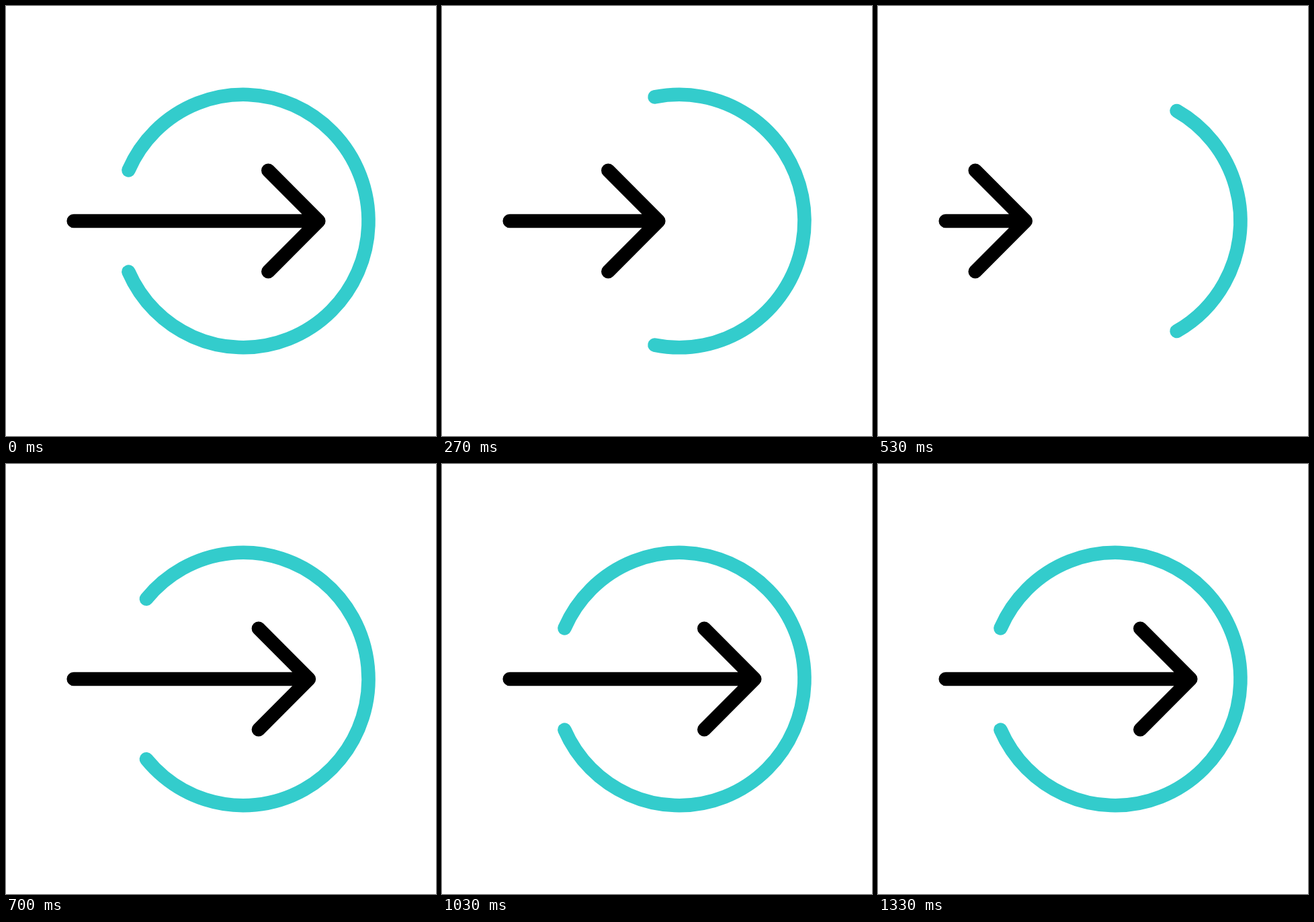
An HTML page with a canvas for the animation above (2 s loop, 640 px wide and 640 px high).

```html
<!DOCTYPE html>
<html lang="en">
<head>
<meta charset="utf-8">
<title>Arrow entering a ring</title>
<style>
  html, body { margin: 0; width: 100%; height: 100%; overflow: hidden; background: #fff; }
  canvas { display: block; }
</style>
</head>
<body>
<canvas id="stage" width="640" height="640"></canvas>
<script>
const ctx = document.getElementById('stage').getContext('2d');
ctx.lineWidth = 20.6;
ctx.lineCap = ctx.lineJoin = 'round';

const LOOP = 2000;
// [tick, value] at 30 ticks per second
const ARROW_SHIFT = [[0, 0], [15, 260], [22, 0], [27, 142], [31, 0], [36, 85], [40, 0]];
const RING_GAP = [[0, 23.7], [15, 123.7], [23, 23.7]];

function valueAt(keys, tick) {
  const next = keys.findIndex(([k]) => k > tick);
  if (next < 0) return keys[keys.length - 1][1];
  const [t0, v0] = keys[next - 1];
  const [t1, v1] = keys[next];
  const p = (tick - t0) / (t1 - t0);
  return v0 + (v1 - v0) * p * p * (3 - 2 * p);
}

function draw(tick) {
  ctx.fillStyle = '#fff';
  ctx.fillRect(0, 0, 640, 640);

  const gap = valueAt(RING_GAP, tick) * Math.PI / 180;
  ctx.strokeStyle = '#33cccc';
  ctx.beginPath();
  ctx.ellipse(353.1, 320, 186.4, 188.2, 0, gap - Math.PI, Math.PI - gap);
  ctx.stroke();

  const tip = 465.3 - valueAt(ARROW_SHIFT, tick);
  ctx.strokeStyle = '#000';
  ctx.beginPath();
  ctx.moveTo(100.7, 320);
  ctx.lineTo(tip, 320);
  ctx.moveTo(tip - 75, 244.7);
  ctx.lineTo(tip, 320);
  ctx.lineTo(tip - 75, 395.3);
  ctx.stroke();
}

function loop() {
  // Ticks fall on whole hundredths of a second
  const time = Math.floor(performance.now() % LOOP / 10) * 10;
  draw(Math.floor((time + 4) * 0.03));
  requestAnimationFrame(loop);
}
loop();
</script>
</body>
</html>
```
